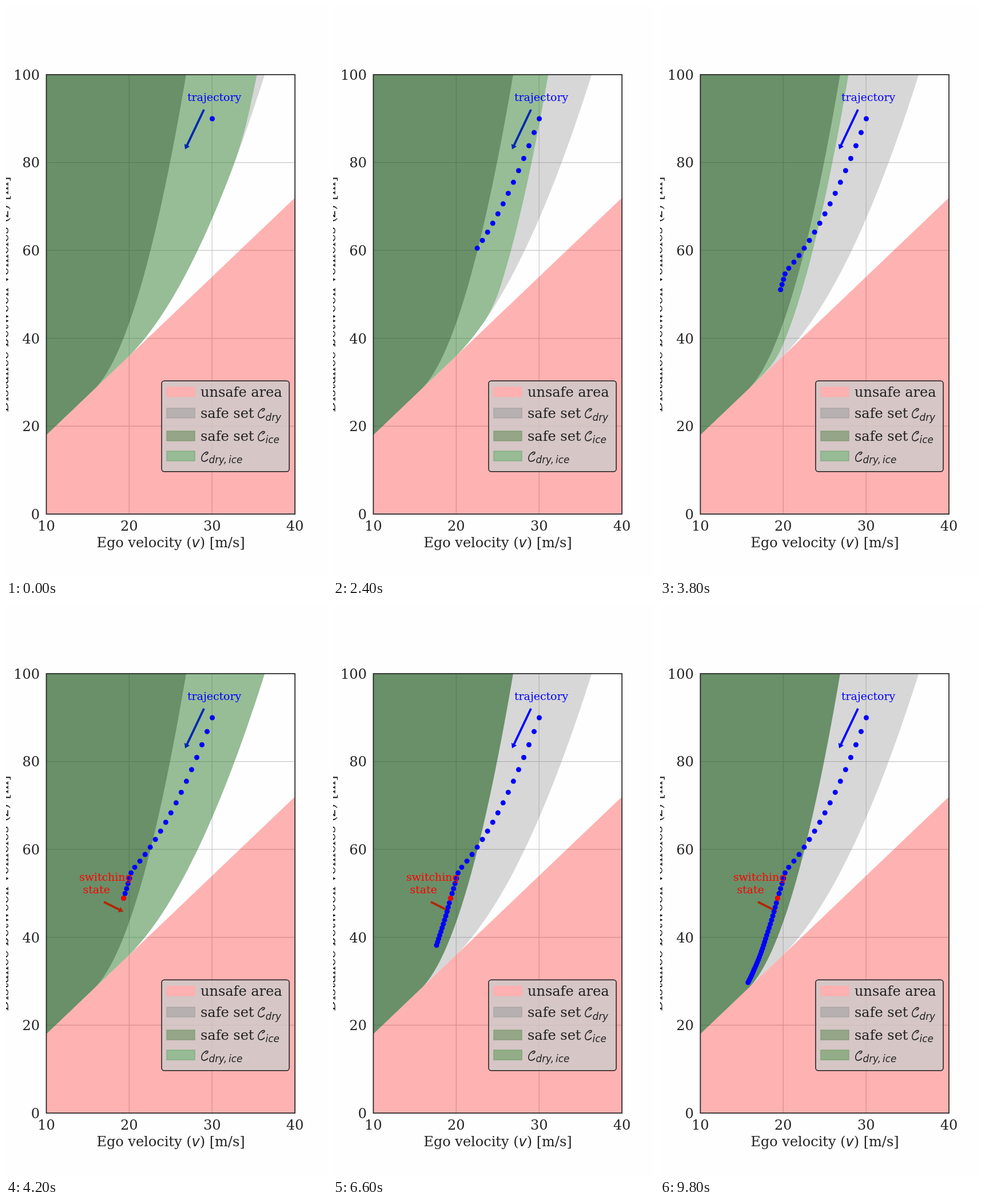
An HTML page with a canvas that plays this animation: 561x998 px, repeating every 10000 ms.

```html
<!DOCTYPE html>
<html lang="en">
<head>
<meta charset="utf-8">
<title>Safe sets and trajectory</title>
<style>
html, body { margin: 0; width: 100%; height: 100%; overflow: hidden; background: #fefefe; }
canvas { display: block; width: 561px; height: 998px; }
</style>
</head>
<body>
<canvas id="stage" width="561" height="998"></canvas>
<script>
const ctx = document.getElementById('stage').getContext('2d');
const STEP = 200, STEPS = 50, SWITCH = 21;
const LEFT = 70.5, RIGHT = 505, TOP = 120, BOTTOM = 888;
const PX_V = (RIGHT - LEFT) / 30, PX_Z = (BOTTOM - TOP) / 100;
const INK = '#222';
const SERIF = '"DejaVu Serif", serif', SANS = '"DejaVu Sans", sans-serif';

const px = v => LEFT + (v - 10) * PX_V;
const py = z => BOTTOM - z * PX_Z;

// Smallest safe distance for speed v on each surface
const unsafe = v => 1.8 * v;
const dry = v => unsafe(v) + Math.max(0, v - 19.7) ** 2 / 8.02;
const ice = v => unsafe(v) + Math.max(0, v - 15.76) ** 2 / 2.39;

// Brake on the dry road for the remaining time, then meet the ice limit
function combined(v, left) {
  const brake = 3.76, lead = 13.6;
  const a = dry(v);
  const b = (v - lead) * left - brake * left * left / 2 + ice(v - brake * left);
  const soft = 2.5, near = Math.max(0, 1 - Math.abs(a - b) / soft);
  return Math.max(a, b) + soft * near * near / 4;
}

// Step number and x of the state, linear between
const KNOTS = [[0, 360.5], [15, 225], [16, 218.5], [21, 205.5], [26, 195],
  [30, 186.5], [36, 175.5], [42, 164.5], [49, 153.8]];

function stateX(n) {
  const i = Math.max(1, KNOTS.findIndex(k => k[0] >= n));
  const [n0, x0] = KNOTS[i - 1], [n1, x1] = KNOTS[i];
  return x0 + (x1 - x0) * (n - n0) / (n1 - n0);
}

const path = [{ x: KNOTS[0][1], y: 197 }];
for (let n = 1; n < STEPS; n++) {
  const last = path[n - 1], x = stateX(n);
  const speed = 10 + ((x + last.x) / 2 - LEFT) / PX_V;
  path.push({ x, y: last.y + (speed - 14) * 0.2 * PX_Z });
}

function line(x0, y0, x1, y1, color, width) {
  ctx.strokeStyle = color;
  ctx.lineWidth = width;
  ctx.beginPath();
  ctx.moveTo(x0, y0);
  ctx.lineTo(x1, y1);
  ctx.stroke();
}

function area(limit, edge, color) {
  ctx.fillStyle = color;
  ctx.beginPath();
  ctx.moveTo(LEFT, edge);
  for (let v = 10; v <= 40; v += 0.1) ctx.lineTo(px(v), py(limit(v)));
  ctx.lineTo(RIGHT, py(limit(40)));
  ctx.lineTo(RIGHT, edge);
  ctx.fill();
}

function arrow(x0, y0, x1, y1, color) {
  const len = Math.hypot(x1 - x0, y1 - y0);
  ctx.save();
  ctx.translate(x1, y1);
  ctx.rotate(Math.atan2(y1 - y0, x1 - x0));
  line(-len, 0, -6, 0, color, 3.8);
  ctx.fillStyle = color;
  ctx.beginPath();
  ctx.moveTo(0, 0);
  ctx.lineTo(-8, -5.2);
  ctx.lineTo(-8, 5.2);
  ctx.fill();
  ctx.restore();
}

function dot(p, color) {
  ctx.fillStyle = color;
  ctx.beginPath();
  ctx.arc(p.x, p.y, 4.5, 0, 7);
  ctx.fill();
}

function text(str, x, y, size = 24, color = INK, align = 'left', font = SERIF, style = '') {
  ctx.font = `${style} ${size}px ${font}`;
  ctx.textAlign = align;
  ctx.fillStyle = color;
  ctx.fillText(str, x, y);
  return ctx.measureText(str).width;
}

const math = (str, x, y, size = 24) => text(str, x, y, size, INK, 'left', SANS, 'italic');

// Label with an italic symbol in it, centred on x
function axisLabel(before, symbol, after, x, y) {
  ctx.font = `24px ${SERIF}`;
  const outer = ctx.measureText(before + after).width;
  ctx.font = `italic 24px ${SANS}`;
  x -= (outer + ctx.measureText(symbol).width) / 2;
  x += text(before, x, y);
  x += math(symbol, x, y);
  text(after, x, y);
}

function scriptC(x, y) {
  ctx.save();
  ctx.translate(x, y);
  ctx.strokeStyle = INK;
  ctx.lineWidth = 1.6;
  ctx.lineCap = 'round';
  ctx.beginPath();
  ctx.moveTo(8.5, -12.2);
  ctx.bezierCurveTo(11, -12.5, 13, -14.5, 12.3, -16);
  ctx.bezierCurveTo(10.5, -18.3, 1.5, -13, 1.3, -5.5);
  ctx.bezierCurveTo(1.3, 1.8, 8.5, 0.8, 12, -3.6);
  ctx.stroke();
  ctx.restore();
}

function swatch(y, fill, edge) {
  ctx.fillStyle = fill;
  ctx.fillRect(281, y, 49, 17);
  ctx.strokeStyle = edge;
  ctx.lineWidth = 1.2;
  ctx.strokeRect(281, y, 49, 17);
}

function legend(switched) {
  ctx.beginPath();
  ctx.roundRect(272, 655.3, 223, 158.5, 4.5);
  ctx.fillStyle = 'rgba(204,204,204,0.8)';
  ctx.fill();
  ctx.strokeStyle = '#1c1c1c';
  ctx.lineWidth = 1.5;
  ctx.stroke();

  swatch(666, '#ffb0b0', '#ffb0b0');
  swatch(703, '#b7b0b0', '#a8a2a2');
  swatch(743, '#94a588', '#7d9a73');
  swatch(778, switched ? '#94ad89' : '#96bb95', switched ? '#76a06d' : '#7eaa7e');

  text('unsafe area', 340, 683);
  text('safe set', 340, 720);
  scriptC(439.5, 720);
  math('dry', 453.5, 724.5, 16.8);
  text('safe set', 340, 760);
  scriptC(439.5, 760);
  math('ice', 453.5, 764, 16.8);
  scriptC(340.5, 796);
  const w = math('dry,', 354.5, 799, 16.8);
  math('ice', 354.5 + w + 3, 799, 16.8);
}

function axes() {
  ctx.strokeStyle = INK;
  ctx.lineWidth = 1.7;
  ctx.strokeRect(LEFT, TOP, RIGHT - LEFT, BOTTOM - TOP);
  for (let v = 10; v <= 40; v += 10) text(v, px(v), 917, 24, INK, 'center');
  for (let z = 0; z <= 100; z += 20) text(z, 59, py(z) + 8.7, 24, INK, 'right');
  axisLabel('Ego velocity (', 'v', ') [m/s]', 288, 946);
  ctx.save();
  ctx.translate(4, 504);
  ctx.rotate(-Math.PI / 2);
  axisLabel('Distance between vehicles (', 'z', ') [m]', 0, 0);
  ctx.restore();
}

function draw(n) {
  const marked = n >= SWITCH, switched = n > SWITCH;
  ctx.fillStyle = '#fefefe';
  ctx.fillRect(0, 0, 561, 998);

  ctx.save();
  ctx.beginPath();
  ctx.rect(LEFT, TOP, RIGHT - LEFT, BOTTOM - TOP);
  ctx.clip();
  for (const v of [20, 30]) line(px(v), TOP, px(v), BOTTOM, '#c8c8c8', 1.2);
  for (const z of [20, 40, 60, 80]) line(LEFT, py(z), RIGHT, py(z), '#c8c8c8', 1.2);
  area(unsafe, BOTTOM, 'rgba(255,0,0,0.3)');
  area(dry, TOP, 'rgba(124,124,124,0.3)');
  area(ice, TOP, 'rgba(0,0,0,0.3)');

  arrow(346, 181, 313, 250.5, '#00f');
  if (marked) arrow(171, 519, 205, 536, '#f00');
  const limit = switched ? ice : marked ? dry : v => combined(v, (SWITCH - n) * 0.2);
  area(limit, TOP, 'rgba(0,128,0,0.3)');
  ctx.restore();

  for (let i = 0; i <= n; i++) dot(path[i], '#00f');
  if (marked) dot(path[SWITCH], '#f00');

  axes();
  text('trajectory', 317, 166, 18.9, '#00f');
  if (marked) {
    text('switching', 128, 481.5, 18.9, '#f00');
    text('state', 134.5, 504, 18.9, '#f00');
  }
  legend(switched);
}

const start = performance.now();
let shown = -1;
function tick() {
  const n = Math.floor((performance.now() - start) / STEP) % STEPS;
  if (n !== shown) draw(shown = n);
  requestAnimationFrame(tick);
}
tick();
</script>
</body>
</html>
```
